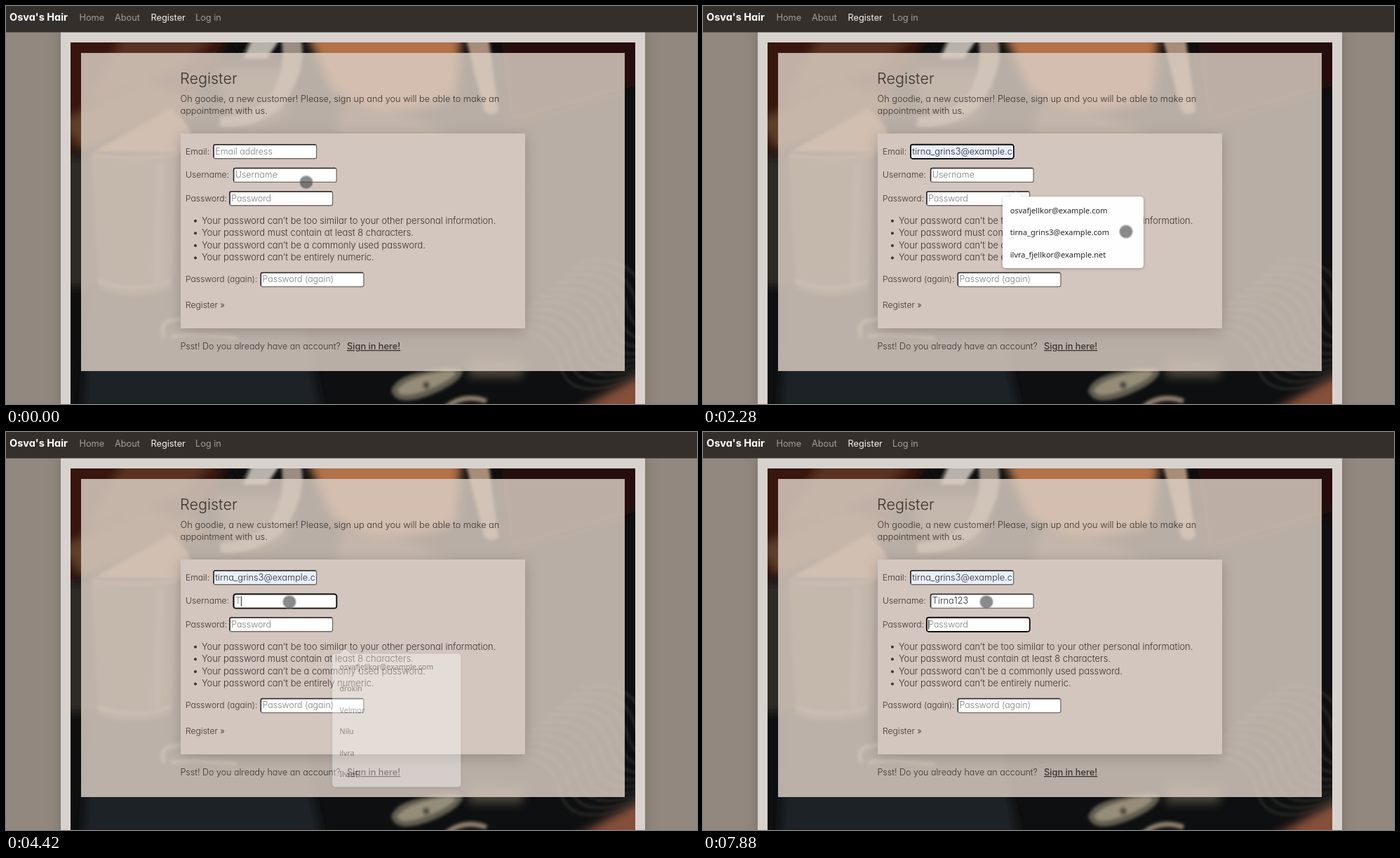
An HTML page for the animation above (8000 ms loop, 985 by 568 pixels).

```html
<!DOCTYPE html>
<html lang="en">
<head>
<meta charset="utf-8">
<title>Register</title>
<style>
  html, body { margin: 0; width: 100%; height: 100%; overflow: hidden; background: #92887f; }
  svg { display: block; }
  text { font: 350 12.75px Inter, "Open Sans", sans-serif; font-feature-settings: "cv11"; fill: #39322e; }
  .brand { font-size: 14.5px; font-weight: 700; fill: #fff; }
  .nav { font-weight: 400; fill: #a39e9a; }
  .nav.on { fill: #f4f2f0; }
  .title { font-size: 21.6px; }
  .label { font-size: 12.1px; }
  .list { font-size: 12.9px; }
  .small { font-size: 12.5px; }
  .link { font-size: 12.8px; font-weight: 500; text-decoration: underline; }
  .hint { font-size: 12.4px; fill: #7d7d7d; }
  .value { fill: #29282c; }
  .option { font: 11.05px "Noto Sans", "Open Sans", sans-serif; fill: #242424; }
</style>
</head>
<body>
<svg id="stage" width="985" height="568" viewBox="0 0 985 568">
  <defs>
    <filter id="soft" filterUnits="userSpaceOnUse" x="40" y="0" width="920" height="640"><feGaussianBlur stdDeviation="7"/></filter>
    <filter id="slight" filterUnits="userSpaceOnUse" x="40" y="0" width="920" height="640"><feGaussianBlur stdDeviation="2"/></filter>
    <filter id="shade" filterUnits="userSpaceOnUse" x="0" y="0" width="985" height="640"><feDropShadow dx="0" dy="4" stdDeviation="10" flood-opacity=".2"/></filter>
    <filter id="lift" x="-20%" y="-20%" width="140%" height="140%"><feDropShadow dx="0" dy="1" stdDeviation="2" flood-opacity=".28"/></filter>
    <clipPath id="photoClip"><rect x="92" y="52" width="805" height="516"/></clipPath>
    <clipPath id="emailClip"><rect x="297" y="198" width="144.5" height="20"/></clipPath>
  </defs>

  <rect width="985" height="568" fill="#92887f"/>
  <rect x="78" y="30" width="833" height="560" fill="#d8d2ce" filter="url(#shade)"/>

  <g clip-path="url(#photoClip)">
    <rect x="92" y="52" width="805" height="516" fill="#0d0f10"/>
    <g filter="url(#soft)">
      <path d="M80 40H320L255 150 80 215Z" fill="#38190f"/>
      <path d="M170 40H300L250 90 110 140Z" fill="#5a3320"/>
      <path d="M80 165L200 110 290 140 110 205Z" fill="#61402c"/>
      <path d="M80 215H250V400H80Z" fill="#2d2927"/>
      <path d="M120 395Q270 370 420 440L450 575H110Z" fill="#1d2426"/>
      <path d="M300 90H410L400 150Q350 190 310 150Z" fill="#51433b"/>
      <path d="M428 40H650L640 130Q540 170 465 120Z" fill="#b4724a"/>
      <path d="M480 140Q620 150 740 260L650 300Q540 200 470 190Z" fill="#4d3a32"/>
      <path d="M705 40H910V110L720 165Z" fill="#27110a"/>
      <path d="M800 585L910 522V585Z" fill="#84503a"/>
      <path d="M660 505L740 508 735 530 660 530Z" fill="#4b443a"/>
    </g>
    <g filter="url(#slight)">
      <path d="M655 45H688L702 150Q692 158 682 150Z" fill="#a88d79"/>
      <path d="M235 146Q260 165 266 190L248 210 124 208Z" fill="#a07659"/>
      <path d="M122 212H246L235 402Q183 424 132 402Z" fill="#534841"/>
      <path d="M122 212Q184 220 246 212M130 392Q183 412 236 392" fill="none" stroke="#85796f" stroke-width="3"/>
      <path d="M220 225L214 395" stroke="#6d6159" stroke-width="9"/>
      <path d="M318 45H352L334 72Z" fill="#100d0c"/>
      <path d="M352 45H392L372 75H338Z" fill="#b9b2aa"/>
      <path d="M392 45H420Q432 90 392 145 350 178 305 172L306 158Q348 158 376 128 400 92 392 45Z" fill="#9b8d81"/>
      <path d="M225 472Q218 448 242 448L310 430M236 472Q258 466 330 474" fill="none" stroke="#8c7b6c" stroke-width="5"/>
      <path d="M549 549Q555 528 599 521 650 509 651 523 645 540 600 557 556 572 549 549Z" fill="#625d50"/>
      <path d="M558 548Q572 530 620 522 645 518 639 527 620 542 590 551 560 560 558 548Z" fill="#958d78"/>
      <circle cx="599" cy="541" r="5" fill="#4b483e"/>
      <path d="M625 575Q650 552 685 564" fill="none" stroke="#8f7e6d" stroke-width="7"/>
      <g id="comb" fill="none" stroke="#403a36" stroke-width="2"></g>
    </g>
  </g>
  <rect x="107" y="67" width="775" height="454" fill="#dacdc3" fill-opacity=".84"/>
  <rect x="249" y="182" width="491" height="278" fill="#d3c6be" filter="url(#shade)"/>

  <rect width="985" height="37.5" fill="#352f2b"/>
  <text class="brand" x="5" y="21">Osva's Hair</text>
  <text class="nav" x="104.5" y="20.5">Home</text>
  <text class="nav" x="155" y="20.5">About</text>
  <text class="nav on" x="206.5" y="20.5">Register</text>
  <text class="nav" x="270" y="20.5">Log in</text>

  <text class="title" x="248" y="111">Register</text>
  <text x="248.5" y="136.5">Oh goodie, a new customer! Please, sign up and you will be able to make an</text>
  <text x="248.5" y="153.5">appointment with us.</text>
  <g id="rules"></g>
  <text class="label" x="256" y="430.5">Register »</text>
  <text class="small" x="248.5" y="490">Psst! Do you already have an account?</text>
  <text class="link" x="486" y="490">Sign in here!</text>

  <g id="fields"></g>
  <rect id="caret" width="1" height="14" fill="#222"/>
  <g id="popups"></g>
  <g id="pointer">
    <circle r="9.2" fill="none" stroke="#8c8c8c" stroke-opacity=".45" stroke-width="2"/>
    <circle r="8.6" fill="#3c3c3c" fill-opacity=".6"/>
  </g>
</svg>
<script>
const $ = id => document.getElementById(id);

function add(parent, tag, attrs, content = "") {
  const node = document.createElementNS("http://www.w3.org/2000/svg", tag);
  for (const key in attrs) node.setAttribute(key, attrs[key]);
  node.textContent = content;
  return parent.appendChild(node);
}

// Comb teeth in the background picture
for (let i = 0; i < 11; i++) {
  const x = 720 + i * 12, y = 485 - i * 10;
  add($("comb"), "path", { d: `M${x - 20} ${y - 20}Q${x + 55} ${y - 32} ${x + 70} ${y + 28}T${x + 190} ${y + 40}` });
}

[
  "Your password can’t be too similar to your other personal information.",
  "Your password must contain at least 8 characters.",
  "Your password can’t be a commonly used password.",
  "Your password can’t be entirely numeric."
].forEach((rule, i) => {
  const y = 310.5 + i * 17.6;
  add($("rules"), "circle", { cx: 270, cy: y - 3.8, r: 2, fill: "#38312d" });
  add($("rules"), "text", { class: "list", x: 279, y }, rule);
});

function makeField(label, hint, x, y) {
  const g = add($("fields"), "g", {});
  add(g, "text", { class: "label", x: 256, y: y + 14.5 }, label);
  const box = add(g, "rect", { x: x + .75, y: y + .75, width: 146.6, height: 20, rx: 2.5, fill: "#fff", stroke: "#716b68", "stroke-width": 1.3 });
  add(g, "path", { d: `M${x + .75} ${y + 19}V${y + 3}q0-2.25 2.25-2.25h143`, fill: "none", stroke: "#2b2827", "stroke-width": 1.5 });
  const ring = add(g, "rect", { x: x + .6, y: y + .6, width: 147, height: 20.4, rx: 3.5, fill: "none", stroke: "#101010", "stroke-width": 1.8 });
  const text = add(g, "text", { x: x + 3, y: y + 14.5, class: "hint" }, hint);
  return { hint, x, y, box, ring, text };
}
const email = makeField("Email:", "Email address", 295.3, 197);
const username = makeField("Username:", "Username", 323.8, 230.7);
const password = makeField("Password:", "Password", 318.2, 264);
const again = makeField("Password (again):", "Password (again)", 362.6, 379.8);
email.text.setAttribute("clip-path", "url(#emailClip)");

function makePopup(x, y, width, options) {
  const height = options.length * 31.7 + 7;
  const g = add($("popups"), "g", {});
  add(g, "path", {
    d: `M${x + 5} ${y}h6l8-7 8 7H${x + width - 5}q5 0 5 5v${height - 10}q0 5-5 5H${x + 5}q-5 0-5-5V${y + 5}q0-5 5-5Z`,
    fill: "#fff", filter: "url(#lift)"
  });
  options.forEach((option, i) =>
    add(g, "text", { class: "option", x: x + 10.7, y: y + 23.7 + i * 31.7 }, option));
  return { g, cx: x + width / 2, cy: y + height / 2 };
}
const emailPopup = makePopup(427, 272, 201, [
  "osvafjellkor@example.com", "tirna_grins3@example.com", "ilvra_fjellkor@example.net"]);
const namePopup = makePopup(461.8, 313, 190, [
  "osvafjellkor@example.com", "drokin", "Velmor", "Nilu", "ilvra", "IlvraF"]);

const clamp = v => Math.min(1, Math.max(0, v));
const smooth = v => v * v * (3 - 2 * v);

// Each move: start, end, destination
const moves = [
  [130, 620, 380, 207.5],
  [1740, 2080, 603, 322],
  [2280, 2550, 404, 233],
  [2550, 2740, 404, 242.5]
];
function pointerAt(t) {
  let x = 428, y = 251.5;
  for (const [start, end, tx, ty] of moves) {
    const k = smooth(clamp((t - start) / (end - start)));
    x += (tx - x) * k;
    y += (ty - y) * k;
  }
  return [x, y];
}

function showPopup({ g, cx, cy }, k) {
  const s = .94 + .06 * k;
  g.setAttribute("opacity", k);
  g.setAttribute("transform", `translate(${cx} ${cy}) scale(${s}) translate(${-cx} ${-cy})`);
}

function setField(field, value, focused) {
  field.text.textContent = value || field.hint;
  field.text.setAttribute("class", value ? "value" : "hint");
  field.ring.setAttribute("visibility", focused ? "visible" : "hidden");
}

const keyTimes = [4280, 5020, 5090, 5350, 5490, 6210, 6340, 6610];
const focusTimes = [680, 2950, 6820];

function draw(t) {
  const typed = "Tirna123".slice(0, keyTimes.filter(k => t >= k).length);
  const focus = t >= 6820 ? password : t >= 2950 ? username : t >= 680 ? email : null;
  const filled = t >= 2280;

  setField(email, filled && "tirna_grins3@example.com", focus === email);
  email.box.setAttribute("fill", filled ? "#e8f0fe" : "#fff");
  setField(username, typed, focus === username);
  username.text.style.fill = t >= 4280 && t < 4490 ? "#777" : "";
  setField(password, "", focus === password);
  setField(again, "", false);

  // The caret's blink restarts on focus and on every key press
  const lastEvent = Math.max(...[...focusTimes, ...keyTimes].filter(k => k <= t));
  const blinkOn = focus && Math.floor((t - lastEvent) / 530) % 2 === 0;
  const autofilled = focus === email && filled;
  $("caret").setAttribute("visibility", blinkOn && !autofilled ? "visible" : "hidden");
  if (focus) {
    const advance = focus === username && typed ? username.text.getComputedTextLength() : 0;
    $("caret").setAttribute("x", focus.x + 3 + advance);
    $("caret").setAttribute("y", focus.y + 3.7);
  }

  showPopup(emailPopup, Math.min(clamp((t - 640) / 110), clamp((2480 - t) / 200)));
  showPopup(namePopup, Math.min(clamp((t - 2910) / 110), clamp((4480 - t) / 150)) * (t >= 2950));
  $("pointer").setAttribute("transform", `translate(${pointerAt(t)})`);
}

const began = performance.now();
function tick() {
  draw((performance.now() - began) % 8000);
  requestAnimationFrame(tick);
}
tick();
</script>
</body>
</html>
```
